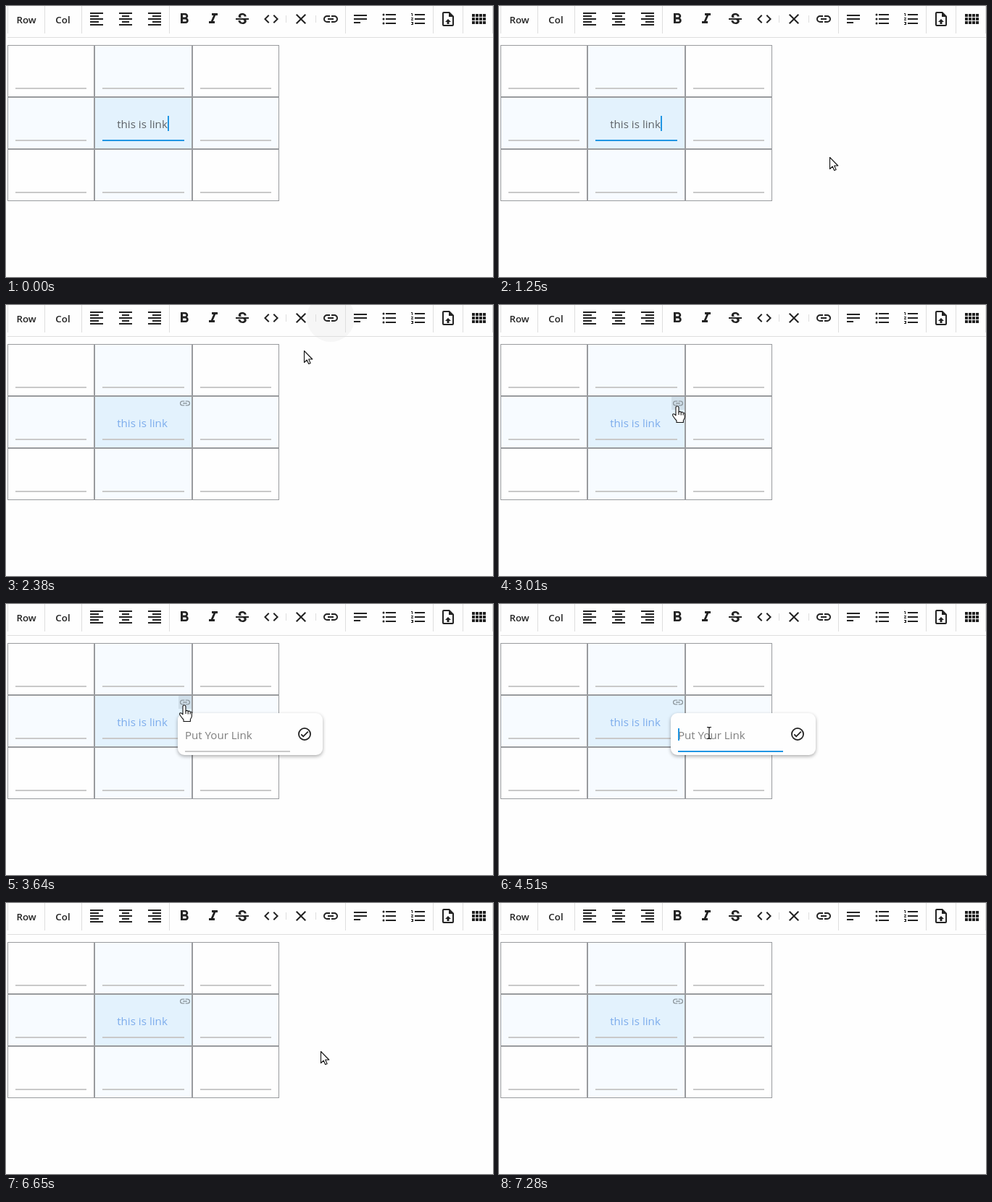
Write an HTML page with a canvas that moves like this. It is 672 px wide and 375 px high and loops after 8410 ms.

```html
<!DOCTYPE html>
<html lang="en">
<head>
<meta charset="utf-8">
<title>Table link editor</title>
<style>
html, body { margin: 0; width: 100%; height: 100%; overflow: hidden; background: #fefefe; }
canvas { display: block; width: 672px; height: 375px; }
</style>
</head>
<body>
<canvas id="stage" width="672" height="375"></canvas>
<script>
const ctx = document.getElementById('stage').getContext('2d');
const LOOP = 8410;
const FONT = '"Open Sans", "Noto Sans", sans-serif';
const INK = '#222', BLUE = '#2196e3', LINE = '#c9c9c9';

// Icons on a 24 by 24 grid
const bars = (left, right) =>
  [3, 7, 11, 15, 19].map((y, i) => i % 2 ? `M${left},${y}H${right}v2H${left}z` : `M3,${y}H21v2H3z`).join('');
const listRows = [5, 11, 17].map(y => `M7,${y}H21v2H7z`).join('');
const dots = [6, 12, 18].map(y => `M2.5,${y}a1.5,1.5 0 1,1 3,0a1.5,1.5 0 1,1 -3,0z`).join('');
const cells = [5, 10, 15].map(y => [3, 8, 13, 18].map(x => `M${x},${y}h4v4h-4z`).join('')).join('');

const icons = {
  left: bars(3, 15),
  center: bars(7, 17),
  right: bars(9, 21),
  bold: 'M13.5,15.5H10V12.5H13.5A1.5,1.5 0 0,1 13.5,15.5M10,6.5H13A1.5,1.5 0 0,1 13,9.5H10M15.6,10.79C16.57,10.11 17.25,9 17.25,8C17.25,5.74 15.5,4 13.25,4H7V18H14.04C16.14,18 17.75,16.3 17.75,14.21C17.75,12.69 16.89,11.39 15.6,10.79Z',
  italic: 'M10,4V7H12.21L8.79,15H6V18H14V15H11.79L15.21,7H18V4Z',
  strike: 'M7.2,9.8C6,7.5 7.7,4.8 10.1,4.3C13.2,3.3 17.7,4.7 17.6,8.5H14.6C14.6,8.2 14.5,7.9 14.5,7.7C14.3,7.1 13.9,6.8 13.3,6.6C12.5,6.3 11.2,6.4 10.5,6.9C9,8.2 10.4,9.5 12,10H7.4M21,13V11H3V13H12.6C13.6,13.4 14.3,13.7 14.5,14.3C14.6,14.7 14.7,15.2 14.5,15.6C14.3,16.1 13.9,16.3 13.4,16.5C11.6,17 9.4,16.3 9.5,14.1H6.5C6.4,16.7 8.6,18.5 11,18.8C14.8,19.6 19.3,17.2 17.3,12.9Z',
  code: 'M14.6,16.6L19.2,12L14.6,7.4L16,6L22,12L16,18ZM9.4,16.6L4.8,12L9.4,7.4L8,6L2,12L8,18Z',
  close: 'M19,6.41L17.59,5L12,10.59L6.41,5L5,6.41L10.59,12L5,17.59L6.41,19L12,13.41L17.59,19L19,17.59L13.41,12Z',
  link: 'M3.9,12C3.9,10.29 5.29,8.9 7,8.9H11V7H7A5,5 0 0,0 7,17H11V15.1H7C5.29,15.1 3.9,13.71 3.9,12M8,13H16V11H8ZM17,7H13V8.9H17C18.71,8.9 20.1,10.29 20.1,12C20.1,13.71 18.71,15.1 17,15.1H13V17H17A5,5 0 0,0 17,7Z',
  text: 'M21,6V8H3V6ZM3,18H12V16H3ZM3,13H21V11H3Z',
  bullets: listRows + dots,
  numbers: listRows + 'M3,8V5H2V4H4V8ZM2,17V16H5V20H2V19H4V18.5H3V17.5H4V17ZM4.25,10A.75,.75 0 0,1 5,10.75C5,10.95 4.92,11.14 4.79,11.27L3.12,13H5V14H2V13.08L4,11H2V10Z',
  upload: 'M14,2L20,8V20A2,2 0 0,1 18,22H6A2,2 0 0,1 4,20V4A2,2 0 0,1 6,2ZM18,20V9H13V4H6V20ZM12,12L16,16H13.5V19H10.5V16H8Z',
  grid: cells,
  check: 'M2,12a10,10 0 1,1 20,0a10,10 0 1,1 -20,0zM4,12a8,8 0 1,0 16,0a8,8 0 1,0 -16,0zM16.59,7.58L10,14.17L7.41,11.59L6,13L10,17L18,9Z'
};
const shapes = {};
for (const name in icons) shapes[name] = new Path2D(icons[name]);

const toolbar = [['left', 125], ['center', 165], ['right', 205], ['bold', 246], ['italic', 286],
  ['strike', 326], ['code', 366], ['close', 407], ['link', 448], ['text', 489],
  ['bullets', 529], ['numbers', 569], ['upload', 610], ['grid', 652]];

// Pointer origins are the tips
const arrow = new Path2D('M0.5,0.5V16.5L4.2,13L6.7,18.5L9.1,17.4L6.7,12H11.8Z');
const hand = new Path2D('M-2,12V2a2,2 0 0,1 4,0V8q2,-1.4 3.2,.4q2,-1 3,.9q2.2,-.6 2.2,1.7V15q0,2 -2,4.5V22.5H-1V20q-2,-2 -4.7,-6q-1.4,-2.4 0,-3.2q1.6,-.6 3.7,2Z');
const knuckles = new Path2D('M2,8V12M5.2,9V12.5M8.2,10V12.5');
const beam = new Path2D('M-3,-8.5H-1L0,-7.5L1,-8.5H3M0,-7.5V6.5M-3,7.5H-1L0,6.5L1,7.5H3');

// [time, pointer, x, y]
const pointer = [
  [0, ''], [1250, 'arrow', 456, 209], [1370, 'arrow', 470, 167], [1500, 'arrow', 459, 82],
  [1620, 'hand', 451, 26], [1750, 'hand', 450.5, 23],
  [2250, 'arrow', 441, 42], [2380, 'arrow', 411, 63], [2510, 'arrow', 350, 101],
  [2630, 'arrow', 288, 127], [2760, 'arrow', 256, 138], [2880, 'hand', 247, 141],
  [3010, 'hand', 246, 140], [3890, 'hand', 254, 149], [4020, 'beam', 276, 172],
  [4140, 'beam', 290, 179], [4900, 'beam', 302, 180], [5020, 'beam', 338, 184],
  [5140, 'beam', 378, 188], [5270, 'hand', 406, 189], [5390, 'hand', 416, 188],
  [5520, 'hand', 420.5, 187], [5770, 'arrow', 419, 187], [6650, 'arrow', 434, 205],
  [6770, 'arrow', 531, 298], [6900, 'arrow', 571, 341], [7030, 'arrow', 592, 354],
  [7150, 'arrow', 608, 364], [7280, '']
];

const during = (t, from, to) => t >= from && t < to;

function box(color, x, y, w, h) {
  ctx.fillStyle = color;
  ctx.fillRect(x, y, w, h);
}

function disc(color, x, y, r) {
  ctx.fillStyle = color;
  ctx.beginPath();
  ctx.arc(x, y, r, 0, 2 * Math.PI);
  ctx.fill();
}

function panel(color, x, y, w, h, r) {
  ctx.fillStyle = color;
  ctx.beginPath();
  ctx.roundRect(x, y, w, h, r);
  ctx.fill();
}

function label(str, x, y, size, color, weight = 400, align = 'left') {
  ctx.font = `${weight} ${size}px ${FONT}`;
  ctx.textAlign = align;
  ctx.fillStyle = color;
  ctx.fillText(str, x, y);
}

function icon(name, x, y, size = 24, color = INK) {
  ctx.save();
  ctx.translate(x - size / 2, y - size / 2);
  ctx.scale(size / 24, size / 24);
  ctx.fillStyle = color;
  ctx.fill(shapes[name], 'evenodd');
  ctx.restore();
}

function drawToolbar(t) {
  if (during(t, 1620, 2510)) disc('#f6f6f6', 448, 18, 33);
  box('#dedede', 2, 43, 670, 1);
  for (const x of [2, 53, 104, 225, 468, 589, 630, 671]) box('#dedede', x, 0, 1, 38);
  for (const x of [386, 427]) box('#dedede', x, 13, 1, 10);
  label('Row', 28, 24, 13.3, INK, 600, 'center');
  label('Col', 78.5, 24, 13.3, INK, 600, 'center');
  for (const [name, x] of toolbar) icon(name, x, 18);
}

function drawTable(t) {
  const cols = [[2, 120], [122, 135], [257, 120]];
  [54, 126, 198].forEach((y, r) => cols.forEach(([x, w], c) => {
    const near = (r === 1) + (c === 1);
    box(['#fefefe', '#f7fbff', '#e3f2fd'][near], x, y, w, 72);
    ctx.strokeStyle = '#999b9e';
    ctx.lineWidth = 1;
    ctx.strokeRect(x + 0.5, y + 0.5, w - 1, 71);
    box(LINE, x + 11, y + 59, w - 22, 2);
  }));

  const linked = t >= 2000;
  if (t < 1880) {
    box(BLUE, 133, 185, 113, 2);
    if (t >= 1750) box('#7d9cb8', 223, 185, 23, 2);
  }
  label('this is link', 188, 168.5, 15.2, linked ? '#7cacec' : '#5d6266', 400, 'center');
  if (t < 370 || during(t, 870, 1370)) box(BLUE, 223, 152, 2, 21);
  if (linked) {
    if (during(t, 2880, 3890)) box('#d0dfea', 238, 127, 18, 18);
    icon('link', 247, 136, 17, '#8f999f');
  }
}

function drawTooltip() {
  panel('#707070', 432, 42, 32, 24, 4);
  label('link', 448, 57.5, 9.2, '#fff', 600, 'center');
}

function drawPopup(t) {
  ctx.save();
  ctx.shadowColor = 'rgba(0,0,0,.32)';
  ctx.shadowBlur = 5;
  ctx.shadowOffsetY = 2;
  panel('#fefefe', 237, 151, 200, 58, 9);
  ctx.restore();

  box(LINE, 247, 203, 145, 2);
  if (t >= 4510) box(BLUE, 247, 203, 145, 2);
  else if (t >= 4390) box(BLUE, 283, 203, 73, 2);

  if (t < 4770) {
    label('Put Your Link', 247, 186.5, 15.1, '#7f7f7f');
  } else {
    ctx.save();
    ctx.beginPath();
    ctx.rect(247, 165, 145, 30);
    ctx.clip();
    label('MarkdownTableGenerator', 390.5, 186.5, 14.6, '#555', 400, 'right');
    ctx.restore();
  }
  if (during(t, 4390, 4770)) box(BLUE, 247, 172, 2, 17);
  if (during(t, 4770, 5270)) box(BLUE, 390, 172, 2, 17);
  if (t >= 5270) disc('#f2f2f2', 412, 180, 20);
  icon('check', 412, 180, 21.5);
}

function drawPointer(t) {
  const [, kind, x, y] = pointer.findLast(p => p[0] <= t);
  if (!kind) return;
  ctx.save();
  ctx.translate(x, y);
  ctx.lineJoin = 'round';
  ctx.strokeStyle = '#111';
  ctx.lineWidth = 1.1;
  if (kind === 'beam') {
    ctx.stroke(beam);
  } else {
    const shape = kind === 'hand' ? hand : arrow;
    ctx.fillStyle = '#fff';
    ctx.fill(shape);
    ctx.stroke(shape);
    if (kind === 'hand') ctx.stroke(knuckles);
  }
  ctx.restore();
}

function draw(t) {
  box('#fefefe', 0, 0, 672, 375);
  drawToolbar(t);
  drawTable(t);
  if (during(t, 1750, 2130)) drawTooltip();
  if (during(t, 3640, 5770)) drawPopup(t);
  drawPointer(t);
}

const start = performance.now();
function tick() {
  draw((performance.now() - start) % LOOP);
  requestAnimationFrame(tick);
}
tick();
</script>
</body>
</html>
```
